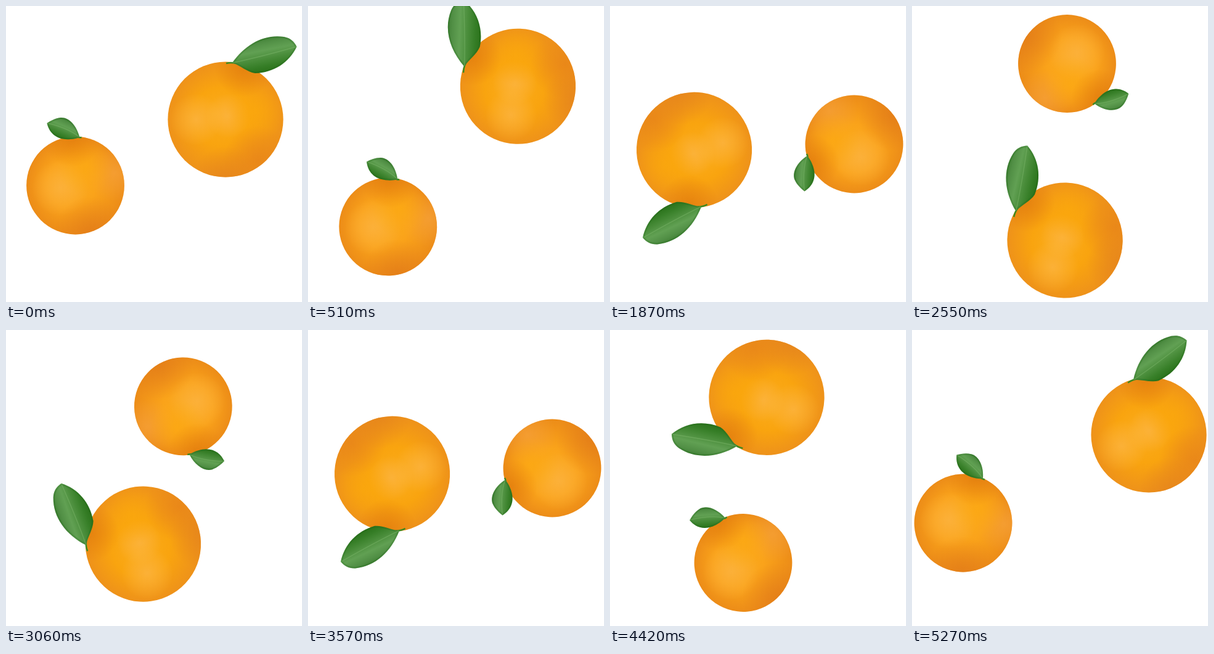
Recreate the animation shown at these times as an HTML page with a canvas. Size 480 px wide and 480 px high, loop 5.44 s.

```html
<!DOCTYPE html>
<html lang="en">
<head>
<meta charset="utf-8">
<title>Oranges</title>
<style>
html, body { margin: 0; width: 100%; height: 100%; overflow: hidden; background: #fff; }
canvas { display: block; width: 100vmin; height: 100vmin; }
</style>
</head>
<body>
<canvas id="stage" width="480" height="480"></canvas>
<script>
const ctx = document.getElementById('stage').getContext('2d');
const STEP = 170, TURN = 16;

// Both oranges round a corner every five steps, with a key on each side of it
const keyStep = i => 5 * Math.floor(i / 2) + i % 2;

const big = {
  r: 93.6,
  x: [356, 384, 285, 254, 98, 136.6, 248, 259],
  y: [184, 170, 96, 109.3, 198, 233.4, 380, 383],
  turn: [0, -22.5, -131, -155.5, -193, -194, -66, -46],
  base: ['#fbac1c', '#f9a40f', '#ee921a'],
  shades: [
    [-48, 0, 42, '#fcb546'], [4, -6, 36, '#fcb546'], [50, -14, 50, '#fba80c'],
    [30, -84, 48, '#e27c0b'], [52, 66, 56, '#e78319'], [0, 98, 54, '#e4821c']
  ],
  leaf: new Path2D('M11-92C32-122 63-139 95-134C105-132 111-127 115.5-118C103-92 78-76 48-75C35-77 25-87 11-92Z'),
  vein: new Path2D('M12-92Q55-101 115-118'),
  stem: new Path2D('M1-91Q9-93 17-91'),
  across: [55, -136, 67, -75]
};
const small = {
  r: 79.4,
  x: [112.5, 83, 188, 216, 372, 396, 251.5, 238],
  y: [291, 313, 395, 377.5, 250, 224, 93.5, 83],
  turn: [0, 19, -13, -27, -94, -109, -219.5, -238],
  base: ['#fbac22', '#faa31a', '#ec8c18'],
  shades: [
    [-24, 4, 46, '#fcb343'], [64, -20, 46, '#f6a13a'], [16, -30, 45, '#fca912'],
    [-6, -76, 46, '#e37d0b'], [24, 76, 58, '#e27b18']
  ],
  leaf: new Path2D('M7-78C2-98-11-111-24-110C-33-109-40-105-46-101C-43-87-32-73-8-75C-2-75 3-77 7-78Z'),
  vein: new Path2D('M6-79Q-12-93-45-101'),
  stem: new Path2D('M10-78Q5-77 2-80'),
  across: [-12, -110, -27, -75]
};

function slope(values, i) {
  const a = Math.max(i - 1, 0), b = Math.min(i + 1, values.length - 1);
  return (values[b] - values[a]) / (keyStep(b) - keyStep(a));
}

// Cubic interpolation through the keys
function at(values, t) {
  let i = 0;
  while (i < values.length - 2 && keyStep(i + 1) <= t) i++;
  const span = keyStep(i + 1) - keyStep(i), u = (t - keyStep(i)) / span, v = 1 - u;
  return values[i] * (1 + 2 * u) * v * v + values[i + 1] * u * u * (1 + 2 * v) +
    span * u * v * (slope(values, i) * v - slope(values, i + 1) * u);
}

function paint(gradient, colors, path) {
  colors.forEach((color, i) => gradient.addColorStop(i / (colors.length - 1), color));
  ctx.fillStyle = gradient;
  ctx.fill(path);
}

function line(path, color, width) {
  ctx.strokeStyle = color;
  ctx.lineWidth = width;
  ctx.stroke(path);
}

function drawFruit({ r, x, y, turn, base, shades, leaf, vein, stem, across }, t) {
  ctx.save();
  ctx.translate(at(x, t), at(y, t));
  ctx.rotate(at(turn, t) * Math.PI / 180);

  const peel = new Path2D();
  peel.arc(0, 0, r, 0, 2 * Math.PI);
  paint(ctx.createRadialGradient(-r * .15, -r * .1, 0, 0, 0, r), base, peel);
  for (const [sx, sy, size, color] of shades) {
    const glow = ctx.createRadialGradient(sx, sy, 0, sx, sy, size);
    paint(glow, [color + 'b8', color + '60', color + '00'], peel);
  }

  line(stem, '#3c8a22', 2.5);
  paint(ctx.createLinearGradient(...across),
    ['#35772a', '#518f45', '#61a053', '#4b8e3c', '#367e27', '#286f18'], leaf);
  ctx.clip(leaf);
  line(leaf, '#1f661640', 5);
  line(vein, '#7db56b80', 1.3);
  ctx.restore();
}

function draw() {
  const step = Math.floor(performance.now() / STEP) % (2 * TURN);
  const t = TURN - Math.abs(TURN - step);
  ctx.clearRect(0, 0, 480, 480);
  drawFruit(big, t);
  drawFruit(small, t);
  requestAnimationFrame(draw);
}
draw();
</script>
</body>
</html>
```
